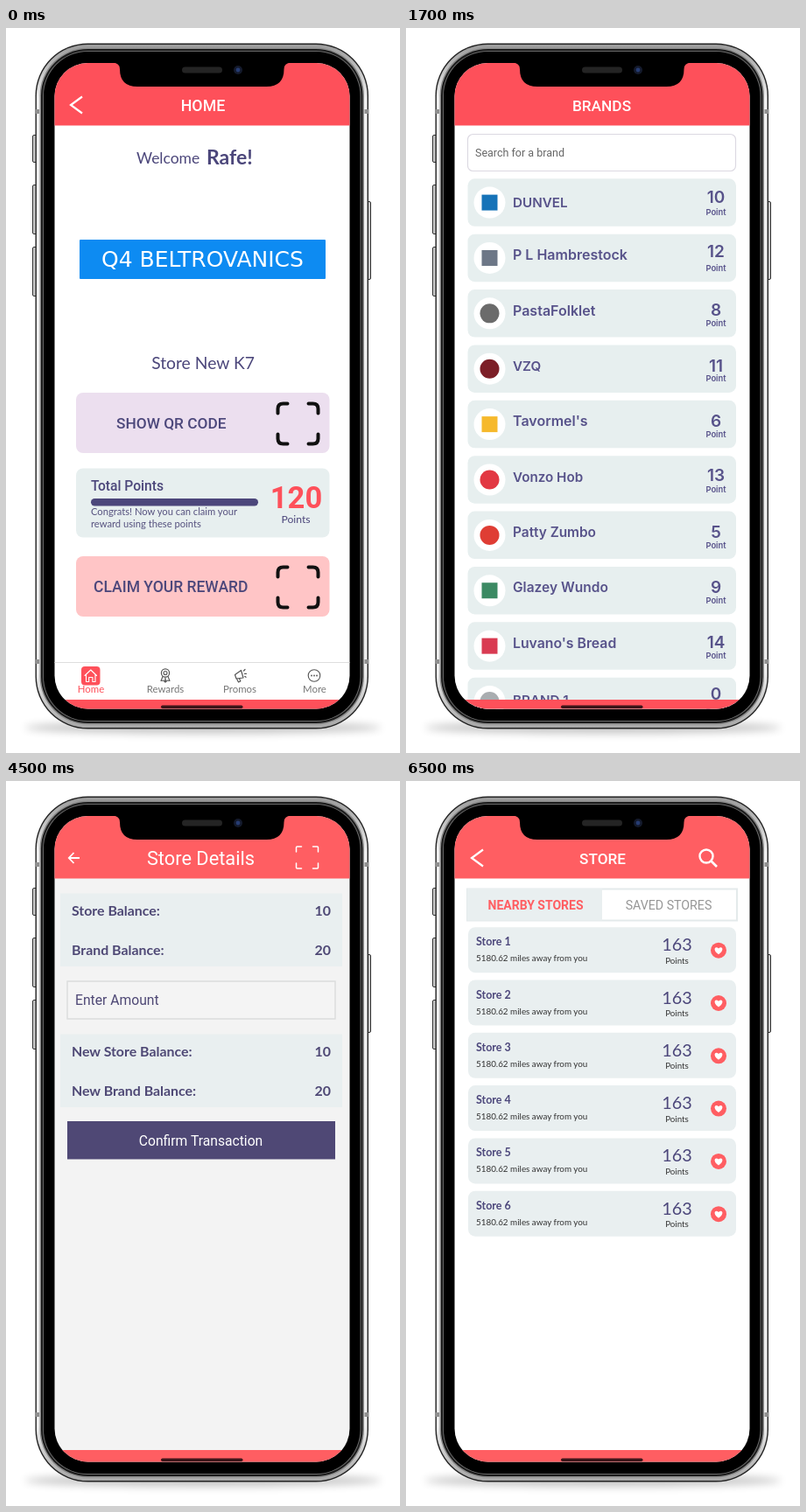
Write an HTML page that moves like this. It is 450x829 px and loops after 8000 ms.

```html
<!DOCTYPE html>
<html lang="en">
<head>
<meta charset="utf-8">
<title>Loyalty app screens</title>
<style>
html, body { margin: 0; width: 100%; height: 100%; overflow: hidden; background: #fff; }
svg { display: block; width: 100%; height: 100%; }
text { white-space: pre; }
.r { font-family: Roboto, Arial, sans-serif; }
.l { font-family: Lato, "Open Sans", sans-serif; }
.i { font-family: Inter, "Open Sans", sans-serif; }
.d { font-family: "DejaVu Sans", Verdana, sans-serif; }
</style>
</head>
<body>
<svg id="stage" viewBox="0 0 450 829"></svg>
<script>
const INK = '#4c477b', PALE = '#e7efef', RED = '#ff5e62', HOT = '#fe505a';

const rect = (x, y, w, h, r, fill, more = '') =>
  `<rect x="${x}" y="${y}" width="${w}" height="${h}" rx="${r}" fill="${fill}" ${more}/>`;
const disc = (x, y, r, fill, more = '') =>
  `<circle cx="${x}" cy="${y}" r="${r}" fill="${fill}" ${more}/>`;
const line = (d, color, w, more = '') =>
  `<path d="${d}" fill="none" stroke="${color}" stroke-width="${w}" ${more}/>`;
const text = (x, y, s, size, fill, font = 'r', weight = 400, anchor = 'start') =>
  `<text class="${font}" x="${x}" y="${y}" font-size="${size}" fill="${fill}" font-weight="${weight}" text-anchor="${anchor}">${s}</text>`;
const mid = (x, y, s, size, fill, font, weight) => text(x, y, s, size, fill, font, weight, 'middle');
const end = (x, y, s, size, fill, font, weight) => text(x, y, s, size, fill, font, weight, 'end');

const ROUND = 'stroke-linecap="round" stroke-linejoin="round"';
const chevron = x => line(`M${x + 13} 78.5L${x} 88L${x + 13} 97.5`, '#fff', 2.2);

// Four corner marks of a scan frame
function corners(x, y, s, arm, r, color, w) {
  let d = '';
  for (const [cx, cy, sx, sy] of [[x, y, 1, 1], [x + s, y, -1, 1], [x, y + s, 1, -1], [x + s, y + s, -1, -1]])
    d += `M${cx + sx * arm} ${cy}L${cx + sx * r} ${cy}Q${cx} ${cy} ${cx} ${cy + sy * r}L${cx} ${cy + sy * arm}`;
  return line(d, color, w, ROUND);
}

// Page background, header and the strip at the foot
function page(bg, head, foot, body) {
  return rect(55, 40, 338, 739, 0, bg) + body +
    rect(55, 40, 338, 71.5, 0, head) +
    rect(55, foot, 338, 14, 0, head);
}

function home() {
  const nav = '#555', label = '#777';
  const body =
    text(149, 155, 'Welcome', 17.5, INK, 'l') +
    text(229, 156, 'Rafe!', 23, INK, 'l', 700) +
    rect(84, 242, 281, 45, 1, '#0d8bf2') +
    mid(224.5, 273, 'Q4 BELTROVANICS', 25, '#fff', 'd') +
    mid(225, 390, 'Store New K7', 19.3, INK, 'l') +
    rect(80, 417, 289.5, 69, 8, '#ecdfef') +
    text(126, 458, 'SHOW QR CODE', 17.3, INK, 'r', 500) +
    corners(310.5, 429.5, 46, 11, 6, '#111', 4) +
    rect(80, 503.5, 289.5, 79, 8, PALE) +
    text(97, 529, 'Total Points', 15.6, INK, 'r', 500) +
    rect(97, 538, 191, 8.5, 4.2, INK) +
    text(97, 557, 'Congrats! Now you can claim your', 11.2, '#56527f', 'l') +
    text(97, 571, 'reward using these points', 11.2, '#56527f', 'l') +
    mid(331.5, 549, '120', 34.5, HOT, 'r', 700) +
    mid(331, 566, 'Points', 12.2, INK, 'l') +
    rect(80, 604, 289.5, 69, 8, '#ffc5c6') +
    text(100, 645, 'CLAIM YOUR REWARD', 17.5, INK, 'r', 500) +
    corners(310.5, 616.5, 46, 11, 6, '#111', 4) +
    rect(55, 725, 338, 1, 0, '#dedede') +
    rect(86, 730, 21.5, 21.5, 4, HOT) +
    line('M90 740.5L96.8 734L103.500 740.5M91.500 739.5V747.500H94.700V742.5H98.900V747.500H102V739.5', '#fff', 1.1, ROUND) +
    disc(182, 737.5, 4.6, 'none', `stroke="${nav}" stroke-width="1.2"`) +
    disc(182, 737.5, 2, 'none', `stroke="${nav}" stroke-width="1.1"`) +
    line('M179 741.5L177 746.5L180 746L181.500 748L182 743L182.500 748L184 746L187 746.5L185 741.5', nav, 1.1, ROUND) +
    line('M261.500 739.5L268.500 734.5L271 743L263 744ZM263.500 744L265.500 748L267.800 747L266.500 743.6M271.500 735L273 733.5M272.500 738.3H274.500M272.700 741.3L274 742.3', nav, 1.2, ROUND) +
    disc(352, 740.5, 6.8, 'none', `stroke="${nav}" stroke-width="1.1"`) +
    [349, 352, 355].map(x => disc(x, 740.5, 0.9, nav)).join('') +
    mid(97, 760, 'Home', 11.4, HOT, 'l') +
    mid(182, 760, 'Rewards', 11.4, label, 'l') +
    mid(267, 760, 'Promos', 11.4, label, 'l') +
    mid(352.5, 760, 'More', 11.4, label, 'l');
  return page('#fff', HOT, 768, body) + chevron(74) + mid(225, 95, 'HOME', 17.8, '#fff', 'r', 500);
}

// name, size, points, mark colour, mark kind, name offset, number offset
const BRANDS = [
  ['DUNVEL', 15.2, 10, '#1673b8', 'box', 33, 28],
  ['P L Hambrestock', 16, 12, '#6d7787', 'box', 29.5, 26],
  ['PastaFolklet', 16, 8, '#6b6b6b', 'dot', 29.5, 30],
  ['VZQ', 15.2, 11, '#7c1f27', 'dot', 29.5, 30.5],
  ['Tavormel\'s', 16, 6, '#f6b92c', 'box', 29.5, 30.5],
  ['Vonzo Hob', 15.2, 13, '#e23843', 'dot', 29.5, 29],
  ['Patty Zumbo', 15.4, 5, '#df3d34', 'dot', 29.5, 30],
  ['Glazey Wundo', 15.5, 9, '#3b8a63', 'box', 29.5, 30],
  ['Luvano\'s Bread', 15.8, 14, '#d93b52', 'box', 30, 30],
  ['BRAND 1', 15.2, 0, '#a9adb0', 'dot', 31, 25.5]
];

function brands() {
  const ink = '#57528a';
  let body = rect(70.5, 121.5, 306, 42, 6, '#fff', 'stroke="#dcd9e2" stroke-width="1.2"') +
    text(79, 147, 'Search for a brand', 12.5, '#666');
  BRANDS.forEach(([name, size, pts, color, kind, dy, ny], i) => {
    const y = 172.3 + 63.38 * i;
    body += rect(70.5, y, 306.5, 54.5, 8, PALE) + disc(95.5, y + 27.3, 18, '#fff') +
      (kind === 'dot' ? disc(95.5, y + 27.3, 11, color) : rect(86.5, y + 18.3, 18, 18, 0, color)) +
      text(122, y + dy, name, size, ink, 'i', 600) +
      mid(354, y + ny, pts, 19, ink, 'i', 600) +
      mid(354, y + 42, 'Point', 9.4, ink, 'i', 600);
  });
  return page('#fff', HOT, 768, body) + mid(223.5, 95, 'BRANDS', 17.3, '#fff', 'r', 500);
}

function history() {
  const ink = '#4f4a74';
  const card = (top, id) => rect(71, top, 306, 140, 7, '#faf9fa') + [
    ['Date', '2024-11-22'], ['Time', '13:52:07'], ['Transaction_Id', id],
    ['Store_Id', '66470f2b3d5aac367a0f0ec1'], ['Brand', 'New Brand Demo']
  ].map(([k, v], i) => {
    const y = top + 32 + 22.9 * i;
    return text(80, y, k, 13.8, ink) + text(175.5, y, ':', 13.8, ink) + text(187, y, v, 13.8, ink);
  }).join('');
  const body = rect(71, 120.5, 306, 42, 7, '#fff') + rect(71, 120.5, 102, 42, 7, RED) +
    mid(121, 147, 'THIS STORE', 13.2, '#fff') +
    mid(224, 147, 'THIS BRAND', 13.2, ink) +
    mid(326, 147, 'ALL DATA', 13.2, ink) +
    card(188, '6720916d81b51892eb73c5e1') +
    card(341, '6734a355a9267582ee6114ec');
  return page('#4f4875', RED, 765, body) + chevron(75) +
    mid(224, 94, 'TRANSACTIONS HISTORY', 17.8, '#fff', 'l');
}

function details() {
  const ink = '#4e4875';
  const pair = (y, k, v) => text(75, y, k, 15.9, ink, 'l', 700) + end(371, y, v, 15.9, ink, 'l', 700);
  const body = rect(62, 128.5, 322, 83.5, 0, '#e9eff0') +
    pair(154, 'Store Balance:', 10) + pair(199, 'Brand Balance:', 20) +
    rect(70, 229, 306, 43, 0, '#f4f4f4', 'stroke="#dadcdc" stroke-width="1.4"') +
    text(79, 256, 'Enter Amount', 15.7, ink) +
    rect(62, 289.5, 322, 83.5, 0, '#e9eff0') +
    pair(314.5, 'New Store Balance:', 10) + pair(360, 'New Brand Balance:', 20) +
    rect(70, 389, 306, 43.5, 0, '#4f4875') +
    mid(222.5, 417, 'Confirm Transaction', 15.7, '#fff');
  return page('#f3f3f3', RED, 765, body) +
    line('M84 88H72M77.500 82L71.800 88L77.500 94', '#fff', 1.8) +
    mid(222.5, 96, 'Store Details', 21.8, '#fff') +
    corners(331.500, 75, 25, 6, 1, '#fff', 1.5);
}

function stores() {
  let body = rect(70, 123.5, 308, 36, 0, '#fff', 'stroke="#e4eaeb" stroke-width="2"') +
    rect(70, 123, 154, 36.5, 0, '#e9eff0') +
    mid(148, 147, 'NEARBY STORES', 14, RED, 'r', 700) +
    mid(300, 147, 'SAVED STORES', 14.2, '#969696');
  for (let i = 0; i < 6; i++) {
    const y = 167.2 + 60.3 * i, h = y + 26.5;
    body += rect(71, y, 306, 52, 8, '#e9eff0') +
      text(80, y + 21, 'Store ' + (i + 1), 12.5, INK, 'l', 700) +
      text(80, y + 39, '5180.62 miles away from you', 9.85, '#333', 'l') +
      mid(309.5, y + 27, '163', 19.8, INK, 'l') +
      mid(309.5, y + 41.500, 'Points', 9.8, '#333', 'l') +
      disc(357, h, 9, RED) +
      `<path d="M357 ${h + 4.5}C349.500 ${h - 0.5} 353 ${h - 6} 357 ${h - 2.3}C361 ${h - 6} 364.500 ${h - 0.5} 357 ${h + 4.5}Z" fill="#fff"/>`;
  }
  return page('#fff', RED, 765, body) + chevron(75) +
    mid(224.5, 94.5, 'STORE', 17.2, '#fff', 'r', 500) +
    disc(343, 86, 7.5, 'none', 'stroke="#fff" stroke-width="2.4"') +
    line('M348.500 91.500L355 98', '#fff', 2.6);
}

function phone() {
  const layers = [[0, '#222'], [1.4, 'url(#steel)'], [5, '#8b8b8b'], [6.5, '#1b1b1b'], [8.500, '#6a6a6a'], [9.500, '#000']];
  const side = (x, y, w, h) => rect(x, y, w, h, 1.5, '#c9c9c9', 'stroke="#333" stroke-width="1"');
  const band = y => rect(33, y, 5, 5, 0, '#8f8f8f') + rect(409.500, y, 5, 5, 0, '#8f8f8f');
  return '<ellipse cx="225" cy="800" rx="204" ry="7" fill="#000" opacity=".22" filter="url(#soft)"/>' +
    side(30.500, 122.500, 5, 31) + side(30.500, 179.500, 5, 56) + side(30.500, 250.500, 5, 56) +
    side(412, 198.500, 4.500, 89) +
    layers.map(([n, c]) => rect(33.500 + n, 17.500 + n, 380.500 - 2 * n, 784 - 2 * n, 60 - n, c)).join('') +
    band(93) + band(722);
}

function notch() {
  return '<path d="M122 39.500Q130 40 130 47Q130 67 150 67H297.500Q317.500 67 317.500 47Q317.500 40 325.500 39.500Z" fill="#000"/>' +
    rect(201, 44.500, 46, 7, 3.5, '#242424') +
    disc(265, 48, 5, '#141a2c') + disc(265, 48, 2.4, '#263c72') +
    rect(177, 774.5, 93.500, 3.4, 1.7, '#3c1519');
}

const PAGES = [[0, home], [500, brands], [2500, history], [4500, details], [6500, stores]];
const LOOP = 8000;

document.getElementById('stage').innerHTML =
  `<defs>
    <clipPath id="glass">${rect(55.5, 40, 337, 738.5, 38, '#000')}</clipPath>
    <linearGradient id="steel" x2="0" y2="1">
      <stop offset="0" stop-color="#9a9a9a"/><stop offset=".08" stop-color="#f1f1f1"/>
      <stop offset=".92" stop-color="#ededed"/><stop offset="1" stop-color="#a6a6a6"/>
    </linearGradient>
    <filter id="soft" x="-10%" y="-200%" width="120%" height="500%"><feGaussianBlur stdDeviation="5"/></filter>
  </defs>` + phone() + '<g clip-path="url(#glass)">' +
  PAGES.map(([, draw]) => `<g class="page">${draw()}</g>`).join('') + '</g>' + notch();

const pages = document.querySelectorAll('.page');
const start = performance.now();

function show() {
  const t = (performance.now() - start) % LOOP;
  const now = PAGES.filter(([at]) => at <= t).length - 1;
  pages.forEach((p, i) => { p.style.display = i === now ? '' : 'none'; });
  requestAnimationFrame(show);
}
show();
</script>
</body>
</html>
```
